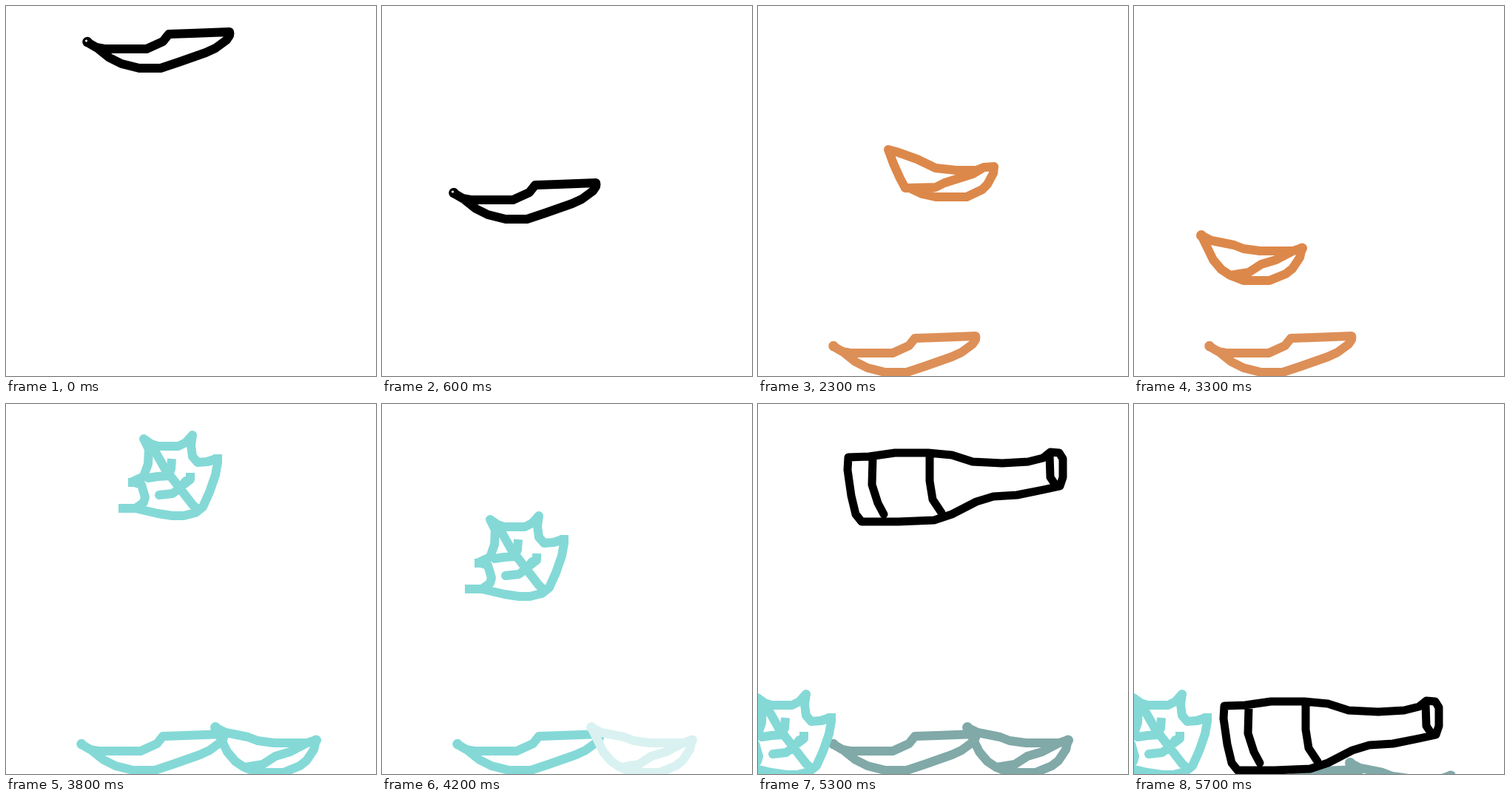
These frames come from a looping animation (500 by 500 pixels, 5.8 s). An HTML page with a canvas:

```html
<!DOCTYPE html>
<html lang="en">
<head>
<meta charset="utf-8">
<title>Falling leaves</title>
<style>
  html, body { margin: 0; width: 100%; height: 100%; overflow: hidden; background: #fff; }
  canvas { display: block; width: 100vw; height: 100vh; }
</style>
</head>
<body>
<canvas id="stage" width="500" height="500"></canvas>
<script>
const ctx = document.getElementById('stage').getContext('2d');
const LOOP = 5800, STEP = 100;
const BLACK = '#000', ORANGE = '#dd884b', PALE_ORANGE = '#dd8f58',
      TEAL = '#84d9d6', PALE_TEAL = '#d9f2f1', DARK_TEAL = '#80a9a8';

const shape = d => new Path2D(d);

const longLeaf = shape('M110 49L122 56 133 58 190 58 212 48 220 38 250 37 302 35 302 40 298 46 283 57 270 63 233 76 209 84 180 84 156 78 140 70 125 58');
const tiltedLeaf = shape('M176 194L187 197 215 207 240 219 268 222 295 222 305 218 319 217 318 226 310 241 303 248 282 258 240 258 222 254 205 246 199 246 192 233 183 213ZM199 246L240 245 252 239 290 227 305 218');
const cupLeaf = shape('M91 310L105 317 135 323 148 328 170 331 215 331 227 327 224 340 214 355 205 362 183 371 148 371 130 364 118 356 107 343ZM130 364L155 360 172 349 192 343 215 331');
const mapleRound = shape('M135 250L146 242 148 235 143 218 131 214 146 207 152 190 153 170 146 156 156 163 165 166 193 166 203 161 212 151 210 165 212 180 219 188 232 187 244 183 M246 188L243 205 235 228 226 248 216 256 200 260 185 260 165 257 135 250M157 165L175 197 212 245 220 252M152 209L165 207 180 206M203 213L196 222 185 230 167 232');
const mapleFlat = shape('M112 250H136M184 183L183 197 178 208M209 202V211L200 218M232 187L246 183V190M246 177V190M125 215H138');
const bottle = shape('M122 408L150 407 185 402 230 402 262 405 290 414 330 416 365 414 385 409 395 401 407 402 412 410 412 435 408 447 385 452 350 459 318 461 295 468 262 485 238 493 190 495 140 495 132 485 126 460 121 425ZM155 410L154 445 162 470 170 485M232 403L232 440 236 465 248 483M394 405L395 435 403 447');

// One [x, y] offset per step, from the moment each thing appears.
const longMoves = [[0, 0], [51, 35], [102, 75], [85, 100], [40, 130], [0, 165], [-13, 204],
  [-56, 232], [0, 250], [60, 280], [119, 305], [75, 335], [30, 361], [119, 390],
  [33, 411], [33, 411], [-8, 411]];
const tiltedMoves = [[-40, -92], [20, -70], [84, -45], [40, -25], [0, 0], [70, -44], [125, -10], [-12, 28]];
const cupMoves = [[50, -70], [10, -45], [-33, -25], [-10, -12], [0, 0], [-18, 40], [50, 75], [120, 105], [192, 127]];
const mapleMoves = [[40, -109], [20, -76], [10, -44], [5, -22], [0, 0], [-5, 32], [-12, 64], [-18, 96],
  [-10, 128], [-35, 160], [-63, 193], [-85, 209], [-107, 222], [-128, 232], [-147, 241]];

const pose = (moves, step) => moves[Math.min(step, moves.length - 1)];

function draw(path, [x, y], color, width = 12, cap = 'round') {
  ctx.save();
  ctx.translate(x, y);
  ctx.strokeStyle = color;
  ctx.lineWidth = width;
  ctx.lineCap = cap;
  ctx.lineJoin = 'round';
  ctx.stroke(path);
  ctx.restore();
}

function dot([x, y], radius, color) {
  ctx.fillStyle = color;
  ctx.beginPath();
  ctx.arc(x, y, radius, 0, Math.PI * 2);
  ctx.fill();
}

function render(ms) {
  const step = Math.floor(ms / STEP);
  const crushed = step >= 57;
  const settle = ([x, y]) => crushed ? [x + 9, y + 48] : [x, y];

  ctx.fillStyle = '#fff';
  ctx.fillRect(0, 0, 500, 500);

  const longColor = step < 19 ? BLACK : step < 38 ? PALE_ORANGE : step < 52 ? TEAL : DARK_TEAL;
  const longAt = settle(pose(longMoves, step));
  draw(longLeaf, longAt, longColor);
  dot([longAt[0] + 110, longAt[1] + 48.5], 6.8, longColor);
  dot([longAt[0] + 301, longAt[1] + 37], 7.5, longColor);
  if (step < 19) dot([longAt[0] + 108.5, longAt[1] + 47], 1.6, '#fff');

  if (step >= 19 && step < 29) {
    draw(tiltedLeaf, pose(tiltedMoves, step - 19), ORANGE);
  } else if (step >= 29) {
    const color = step < 38 ? ORANGE : step < 41 ? TEAL : step < 52 ? PALE_TEAL : DARK_TEAL;
    const at = settle(pose(cupMoves, step - 29));
    draw(cupLeaf, at, color);
    dot([at[0] + 91, at[1] + 310], 7, color);
    dot([at[0] + 227, at[1] + 327.5], 7, color);
  }

  if (step >= 38) {
    const at = pose(mapleMoves, step - 38);
    draw(mapleRound, at, TEAL);
    draw(mapleFlat, at, TEAL, 12, 'butt');
  }

  if (step >= 52) draw(bottle, [0, Math.min(0, (step - 57) * 84)], BLACK, 11);
}

function tick(now) {
  render(now % LOOP);
  requestAnimationFrame(tick);
}
render(0);
requestAnimationFrame(tick);
</script>
</body>
</html>
```
